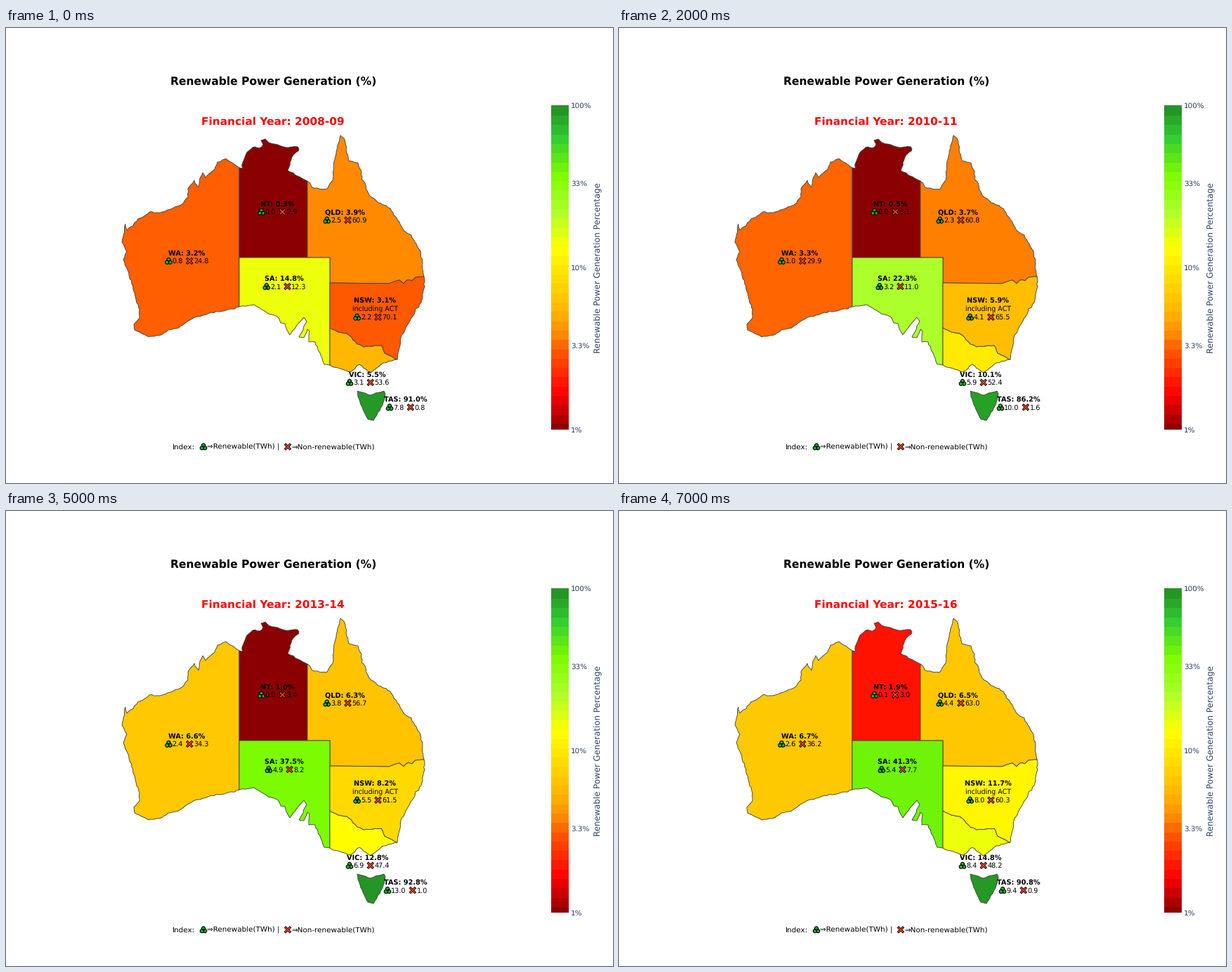
A matplotlib script that plays this animation: 864x648 px, repeating every 8 s.

```python
import numpy as np
import matplotlib.pyplot as plt
from matplotlib.animation import FuncAnimation
from matplotlib.colors import LinearSegmentedColormap
from matplotlib.patches import Circle, Polygon, Rectangle

plt.rcParams["font.family"] = "DejaVu Sans"
plt.rcParams["text.hinting"] = "none"

W, H, DPI = 864, 648, 72  # at 72 dpi one point is one pixel
FIRST_YEAR, YEARS = 2008, 8
SURVEYED = [0, 1, 2, 3, 5, 7]  # years with figures, the rest lie between
SLATE = "#2a3f5f"
rng = np.random.default_rng(4)

fig = plt.figure(figsize=(W / DPI, H / DPI), dpi=DPI, facecolor="white")
ax = fig.add_axes([0, 0, 1, 1])
ax.set_xlim(0, W)
ax.set_ylim(H, 0)
ax.axis("off")

# Colours over log10(percent) / 2
tone = LinearSegmentedColormap.from_list("power", [
    (0, "#8b0000"), (.11, "#ff0000"), (.25, "#ff5d00"), (.30, "#ff8f00"),
    (.37, "#ffb700"), (.41, "#ffc800"), (.50, "#ffe900"), (.56, "#ffff00"),
    (.674, "#adff2c"), (.787, "#7cfc00"), (.90, "#32cd32"), (1, "#228b22")], N=512)


def rough(points, amp=.6):
    """Join key points by a slightly ragged line."""
    points = np.array(points, float)
    line = []
    for a, b in zip(points[:-1], points[1:]):
        n = max(1, round(np.hypot(*(b - a)) / 4))
        steps = a + (b - a) * np.arange(n)[:, None] / n
        steps[1:] += rng.normal(0, amp, (n - 1, 2))
        line += steps.tolist()
    return line + [points[-1].tolist()]


wa_coast = rough([
    (332, 199), (325, 194), (313, 186), (301, 191), (297, 201), (284, 213),
    (280, 206), (276, 214), (274, 227), (268, 217), (259, 229), (259, 241),
    (249, 252), (219, 263), (204, 262), (186, 275), (172, 288), (170, 279),
    (165, 305), (172, 318), (167, 330), (175, 352), (190, 402), (190, 413),
    (182, 422), (183, 430), (203, 440), (218, 438), (231, 430), (246, 427),
    (258, 418), (272, 411), (332, 397)])
nt_coast = rough([
    (332, 199), (337, 200), (336, 194), (343, 177), (351, 170), (361, 171),
    (366, 166), (363, 160), (369, 158), (374, 163), (398, 170), (415, 169),
    (417, 172), (407, 184), (401, 203), (429, 218)])
qld_coast = rough([
    (429, 218), (439, 228), (456, 230), (465, 217), (467, 190), (476, 153),
    (481, 157), (488, 189), (501, 192), (507, 212), (517, 238), (530, 249),
    (547, 257), (557, 273), (566, 288), (577, 295), (590, 318), (595, 354)])
qld_nsw = rough([(595, 354), (583, 355), (578, 360), (571, 359), (566, 364),
                 (560, 359), (545, 364)], .3) + [(461, 363)]
nsw_coast = rough([(595, 354), (596, 361), (592, 387), (575, 417), (562, 441),
                   (557, 472)])
nsw_vic = rough([(557, 472), (539, 463), (534, 452), (509, 454), (500, 450),
                 (485, 435), (473, 433), (461, 427)], .4)
vic_coast = rough([(557, 472), (537, 477), (519, 491), (503, 479), (490, 490),
                   (461, 480)], .4)
sa_coast = rough([
    (332, 397), (353, 394), (364, 401), (388, 413), (391, 420), (397, 421),
    (404, 437), (424, 412), (428, 418), (417, 440), (424, 441), (429, 429),
    (432, 432), (431, 447), (440, 447), (448, 466), (453, 479), (461, 480)], .5)
tas_coast = rough([(500, 517), (519, 523), (538, 517), (540, 521), (536, 537),
                   (523, 559), (515, 557), (508, 543), (501, 525), (500, 517)], .3)
nt_sa, sa_qld = (332, 327), (461, 327)
nt_qld = (429, 327)


def write(x, y, s, size, color="black", ha="left", **kw):
    """Put text with its capitals centred on y."""
    return ax.text(x, y + .365 * size, s, fontsize=size, color=color, ha=ha,
                   va="baseline", zorder=5, **kw)


def leaf(x, y):
    """Green three-lobed mark for renewable power."""
    parts = []
    for a in np.radians([-90, 30, 150]):
        dx, dy = 2.5 * np.cos(a), 2.5 * np.sin(a)
        parts.append(ax.add_patch(Circle((x + dx, y + .6 + dy), 2.6, fc="#1fae2b",
                                         ec="black", lw=1.1, zorder=3)))
        parts += ax.plot([x, x - .8 * dx], [y + .6, y + .6 - .8 * dy],
                         color="black", lw=.9, zorder=4)
    return parts


def cross(x, y):
    """Red cross with a dark rim for other power."""
    parts = []
    for r, width, color in ((4.1, 3.4, "black"), (3.5, 1.8, "#e8401c")):
        xs = [x - r, x + r, np.nan, x - r, x + r]
        ys = [y - r, y + r, np.nan, y + r, y - r]
        parts += ax.plot(xs, ys, color=color, lw=width, zorder=3,
                         solid_capstyle="butt")
    return parts


class State:
    """A region with its renewable share (%) and other power (TWh)."""

    def __init__(self, name, outline, x, y, share, other, note=None):
        self.name, self.x, self.y, self.note = name, x, y, note
        self.share, self.other = (np.interp(range(YEARS), SURVEYED, v)
                                  for v in (share, other))
        self.shape = ax.add_patch(Polygon(outline, ec="#444444", lw=.9, zorder=2))

    def show(self, i):
        """Colour the shape and return the label's artists."""
        share, other = self.share[i], self.other[i]
        self.shape.set_facecolor(tone(np.log10(max(share, 1)) / 2))
        x, y = self.x, self.y
        parts = [write(x, y, f"{self.name}: {share:.1f}%", 9.7, ha="center",
                       weight="bold")]
        if self.note:
            y += 12.3
            parts.append(write(x, y, self.note, 9.5, ha="center"))
        y += 11.8
        ren, non = f"{other * share / (100 - share):.1f}", f"{other:.1f}"
        w_ren, w_non = (9.6 * (.636 * len(s) - .318) for s in (ren, non))
        left = x + .3 - (w_ren + w_non + 26) / 2
        mid = left + 14.1 + w_ren
        parts += leaf(left + 5.5, y) + cross(mid + 5.9, y)
        parts.append(write(left + 10.7, y, ren, 9.6))
        parts.append(write(mid + 11.7, y, non, 9.6))
        return parts


states = [
    State("WA", wa_coast, 257, 320,
          [3.2, 3.0, 3.3, 5.6, 6.6, 6.7], [24.8, 27.0, 29.9, 29.49, 34.3, 36.2]),
    State("NT", nt_coast + [nt_qld, nt_sa], 386, 250,
          [.3, .4, .5, .6, 1.0, 1.9], [2.9, 3.3, 3.1, 3.1, 3.4, 3.0]),
    State("QLD", qld_coast + qld_nsw + [sa_qld, nt_qld], 482.3, 261.8,
          [3.9, 3.5, 3.7, 4.1, 6.3, 6.5], [60.9, 62.1, 60.8, 61.0, 56.7, 63.0]),
    State("SA", sa_coast + [sa_qld, nt_qld, nt_sa], 396.3, 356.3,
          [14.8, 15.7, 22.3, 26.8, 37.5, 41.3], [12.3, 11.6, 11.0, 9.8, 8.2, 7.7]),
    State("VIC", vic_coast + nsw_vic[::-1], 514.5, 493,
          [5.5, 6.6, 10.1, 8.66, 12.76, 14.8], [53.6, 53.2, 52.4, 53.2, 47.4, 48.2]),
    State("NSW", nsw_coast + nsw_vic + qld_nsw[::-1], 525.2, 387.6,
          [3.1, 5.4, 5.9, 6.7, 8.2, 11.7], [70.1, 69.1, 65.5, 64.7, 61.5, 60.3],
          note="including ACT"),
    State("TAS", tas_coast, 568.5, 528.3,
          [91.0, 88.2, 86.2, 84.7, 92.8, 90.8], [.77, 1.18, 1.6, 1.63, 1.01, .949]),
]


def draw_colorbar(x=776, width=25.4, top=110, bottom=572):
    edges = np.r_[top, 125 + 13.3 * np.arange(34), bottom]
    for a, b in zip(edges[:-1], edges[1:]):
        level = 0 if b == bottom else (bottom - (a + b) / 2) / (bottom - top)
        ax.add_patch(Rectangle((x, a), width, b - a, fc=tone(level), lw=0,
                               antialiased=False))
    for pct in (100, 33, 10, 3.3, 1):
        y = bottom - (bottom - top) * np.log10(pct) / 2
        write(804.3, y, f"{pct:g}%", 10.37, SLATE)
    ax.text(842, 341.5, "Renewable Power Generation Percentage", fontsize=11.7,
            color=SLATE, rotation=90, ha="center", va="center")


def draw_index(y=596.3):
    write(236.5, y, "Index:", 10.37)
    leaf(281, y)
    write(286.3, y, "⇒Renewable(TWh) |", 10.37)
    cross(401, y)
    write(406.3, y, "⇒Non-renewable(TWh)", 10.37)


write(380.5, 75, "Renewable Power Generation (%)", 15.5, ha="center", weight="bold")
heading = write(380.3, 132.3, "", 15.4, "red", ha="center", weight="bold")
draw_colorbar()
draw_index()
labels = []


def update(i):
    while labels:
        labels.pop().remove()
    year = FIRST_YEAR + i
    heading.set_text(f"Financial Year: {year}-{(year + 1) % 100:02d}")
    for state in states:
        labels.extend(state.show(i))
    return []


anim = FuncAnimation(fig, update, frames=YEARS, interval=1000, repeat=True,
                     repeat_delay=0, blit=False)
plt.show()
```
